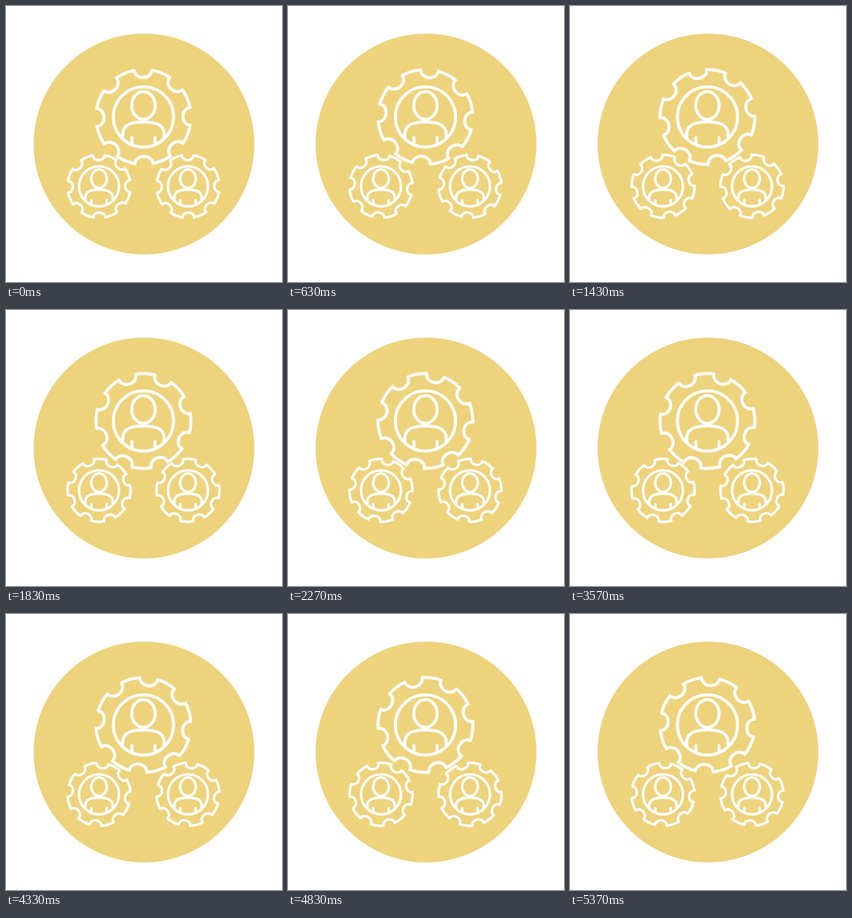
An HTML page that plays this animation: 500 by 500 pixels, repeating every 5410 ms.

```html
<!DOCTYPE html>
<html lang="en">
<head>
<meta charset="utf-8">
<title>Team gears</title>
<style>
  html, body { margin: 0; height: 100%; overflow: hidden; background: #fff; }
  svg { display: block; width: 100vw; height: 100vh; }
</style>
</head>
<body>
<svg viewBox="0 0 500 500">
  <defs>
    <path id="gear"/>
    <g id="person">
      <circle r="54.5"/>
      <ellipse cy="-20.8" rx="21.2" ry="25.2"/>
      <path d="M-37.500 39V31C-37.500 15 -24 9 0 9S37.500 15 37.500 31V39M-21 37.500V47M21 37.500V47"/>
    </g>
  </defs>
  <circle cx="250" cy="250" r="200" fill="#eed37d"/>
  <g id="gears" fill="none" stroke="#fff" stroke-linecap="round" stroke-linejoin="round"></g>
</svg>
<script>
const LOOP = 5410, FRAMES = 162, FPS = 30, TURNS = 2;
const TEETH = 8, RADIUS = 86, NOTCH = 10.8, STEP = 360 / TEETH;

// Point at an angle in degrees clockwise from the top.
function polar(deg, r = RADIUS) {
  const a = deg * Math.PI / 180;
  return `${(r * Math.sin(a)).toFixed(2)} ${(-r * Math.cos(a)).toFixed(2)} `;
}

let outline = `M${polar(-NOTCH)}`;
for (let i = 0; i < TEETH; i++) {
  const a = i * STEP;
  outline += `C${polar(a - 12, 68.6)}${polar(a + 12, 68.6)}${polar(a + NOTCH)}`;
  outline += `A${RADIUS} ${RADIUS} 0 0 1 ${polar(a + STEP - NOTCH)}`;
}
document.getElementById('gear').setAttribute('d', outline + 'Z');

// x, y, scale, stroke width
const places = [[249, 201, 1, 5.5], [168.5, 326.7, 0.664, 7], [329.7, 326.7, 0.664, 7]];
const group = document.getElementById('gears');
group.innerHTML = places.map(([x, y, s, w]) =>
  `<g transform="translate(${x} ${y}) scale(${s})" stroke-width="${w}">
    <use class="wheel" href="#gear"/><use href="#person"/></g>`).join('');
const wheels = group.querySelectorAll('.wheel');

function draw(now) {
  // The wheels step at a fixed frame rate; 4 ms absorbs rounded frame starts.
  const frame = Math.floor((now % LOOP + 4) * FPS / 1000);
  const angle = -0.6 - 360 * TURNS * frame / FRAMES;
  wheels.forEach(w => w.setAttribute('transform', `rotate(${angle})`));
  requestAnimationFrame(draw);
}
draw(0);
</script>
</body>
</html>
```
